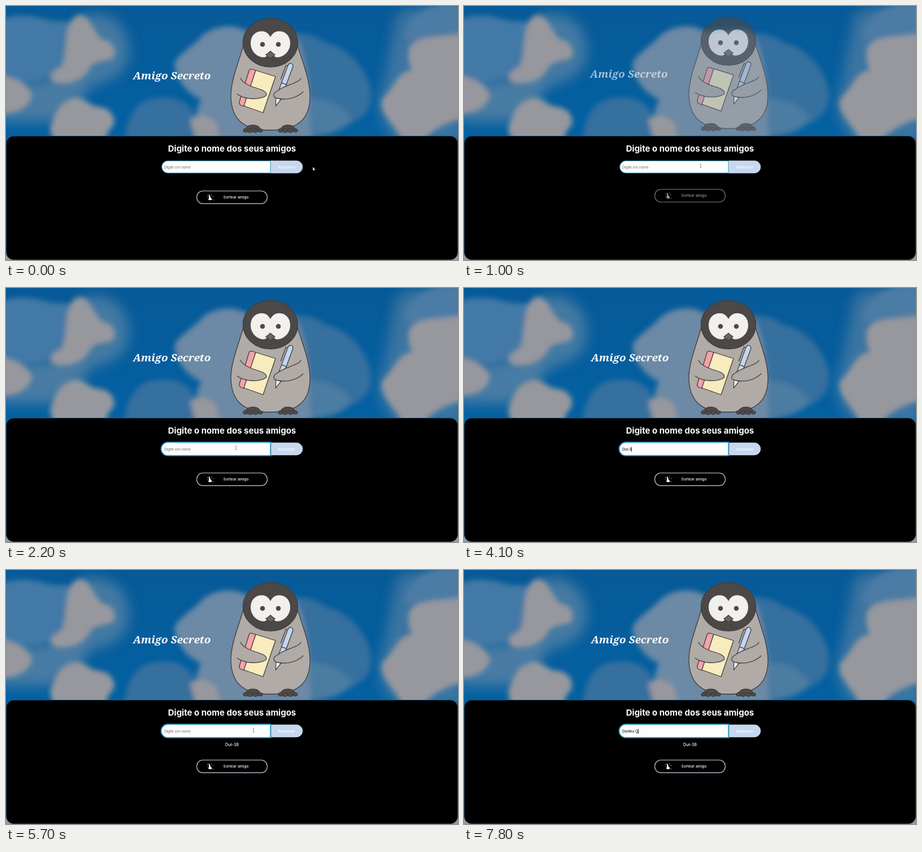
An HTML page for the animation above (8 s loop, 800 by 450 pixels).

```html
<!DOCTYPE html>
<html lang="pt">
<head>
<meta charset="utf-8">
<style>
  html, body { margin: 0; width: 100%; height: 100%; overflow: hidden; background: #000; }
  svg { display: block; width: 100%; height: 100%; }
  text { fill: #fff; white-space: pre; }
  .ui { font: 500 6.67px Inter, sans-serif; }
  .field { font: 6.67px "Liberation Sans", Arial, sans-serif; }
  .line { stroke: #403d3c; stroke-width: 1.3; stroke-linejoin: round; stroke-linecap: round; }
</style>
</head>
<body>
<svg viewBox="0 0 800 450">
  <defs>
    <filter id="soft" x="-10%" y="-10%" width="120%" height="120%"><feGaussianBlur stdDeviation="5"/></filter>
    <filter id="haze" x="-20%" y="-20%" width="140%" height="140%"><feGaussianBlur stdDeviation="11"/></filter>
    <linearGradient id="sky" x2="0" y2="1">
      <stop stop-color="#075a98"/><stop offset=".5" stop-color="#0461a2"/>
    </linearGradient>
    <g id="foot" class="line" fill="#504b49">
      <path d="M-13 5C-14-1-9-6 0-6S13-2 14 5Z"/>
      <path d="M-17 4C-17 0-10-2-9 4C-9 7-17 7-17 4M-9 4C-9-1-1-1-1 4C-1 8-9 8-9 4M0 4C0-1 8-1 8 4C8 8 0 8 0 4M9 4C9-1 17 0 17 4C17 7 9 7 9 4"/>
    </g>
  </defs>

  <rect width="800" height="450" fill="url(#sky)"/>
  <g filter="url(#haze)" fill="#5f86a6">
    <path d="M130 20C165 5 200 20 212 50C225 85 215 115 185 130L130 150Z" opacity=".7"/>
    <path d="M-10 140L60 130L140 115V165L85 205H-10Z" opacity=".75"/>
    <path d="M690 20C700 0 740 0 810 0V240H690C665 210 650 180 668 140Z" opacity=".6"/>
  </g>
  <g filter="url(#soft)">
    <path fill="#4279a6" d="M-10 25C20 12 50 18 75 25S130 15 128 60L110 105C80 130 60 140-10 135Z"/>
    <path fill="#34709f" d="M210 240C212 200 228 172 255 165C290 157 315 165 330 185L345 240Z"/>
    <path fill="#34709f" d="M505 50C530 45 555 55 565 65C595 70 622 95 634 118C648 142 650 165 640 185C620 212 585 220 550 215H505Z"/>
    <path fill="#4c7ba2" d="M530 165C560 160 600 175 612 200C600 222 570 228 530 235Z"/>
    <path fill="#6c89a5" d="M298 102C305 85 330 72 350 50C370 35 405 30 425 45L500 40C525 60 530 100 535 140L540 240H345C330 190 340 180 345 165C320 155 300 130 298 102Z"/>
    <path fill="#4c7ba5" d="M705 60C705 20 740 5 775-5H810V60Z"/>
    <g fill="#97989e">
      <path d="M114 30C122 12 140 12 150 30C158 45 165 55 172 60C185 60 198 75 190 92C175 100 160 95 150 108C142 125 125 138 95 138C72 135 75 118 98 108C108 95 104 50 114 30Z"/>
      <path d="M-10 122C20 128 42 142 46 158C42 180 20 190-10 192Z"/>
      <path d="M78 218C85 190 95 170 115 165C130 155 145 175 160 178C185 180 195 195 190 212C175 225 180 235 175 245H85Z"/>
      <path d="M326 202C338 190 355 192 372 207L380 245H338Z"/>
      <path d="M714 72C730 50 770 57 810 48V150H760C730 140 705 110 714 72Z"/>
      <path d="M666 165C690 140 690 125 710 115L810 110V200C780 205 750 220 735 245H704C692 212 658 190 666 165Z"/>
      <path d="M-10 430H810V460H-10Z"/>
    </g>
  </g>

  <rect x=".5" y="230.5" width="799" height="219" rx="13" stroke="#164a68"/>

  <text id="title" x="224.8" y="130" style="font:italic 700 18.9px 'Noto Serif',serif">Amigo Secreto</text>

  <g id="penguin">
    <path class="line" fill="#b1aba7" d="M420 70C412 100 398 130 398 160C399 198 417 220 468 220S538 198 538 160C538 130 525 100 516 70Z"/>
    <ellipse class="line" cx="468" cy="65" rx="48.5" ry="43" fill="#4b4847"/>
    <path fill="#f2f0ee" d="M468 55C463 45 455 44 449 45C438 47 433 56 433 66C433 80 444 91 457 91L468 86L479 91C492 91 503 80 503 66C503 56 498 47 487 45C481 44 473 45 468 55Z"/>
    <circle cx="454" cy="68" r="4.3" fill="#4b4847"/>
    <circle cx="482" cy="68" r="4.3" fill="#4b4847"/>
    <path class="line" fill="#6e6561" d="M468 80Q472 84 476 86Q473 90 468 93Q463 90 460 86Q464 84 468 80Z"/>
    <g class="line">
      <path fill="#f4a3a8" d="M442 114L435 112Q431 111 430 115L413 170Q412 174 416 176L422 178Z"/>
      <path fill="#f8ebbd" d="M442 114L477 125L455 189L421 177Z"/>
      <g transform="translate(505 102) rotate(20.2)" fill="#c3d6f1">
        <path d="M-4.5 66V5Q-4 0 0 0T4.5 5V66Z"/>
        <path d="M-4.5 38H4.5M-5 6H-8V32" fill="none"/>
        <path d="M-4.5 66H4.5L0 80Z" fill="#fff"/>
      </g>
      <path fill="#b1aba7" d="M415 128C420 138 435 143 448 147C458 150 463 155 460 159C450 166 425 167 409 156"/>
      <path fill="#b1aba7" d="M522 128C518 137 495 139 481 150C470 156 473 163 482 164C500 167 515 162 526 152"/>
    </g>
    <use href="#foot" x="437" y="217"/>
    <use href="#foot" x="499" y="217"/>
  </g>

  <text x="400" y="258" text-anchor="middle" style="font:700 15px Inter,sans-serif">Digite o nome dos seus amigos</text>

  <path d="M468 274.3H514A10.8 10.8 0 0 1 514 295.9H468Z" fill="#c5d8f0" stroke="#d3e1f4" stroke-width=".8"/>
  <text class="ui" x="496.8" y="287.6" text-anchor="middle">Adicionar</text>
  <path id="box" fill="#fdfdff" stroke="#2d93bd"/>
  <text id="value" class="field" x="280" y="287.7"></text>
  <path id="caret" d="M0 281.5V290" stroke="#000" stroke-width=".8"/>

  <text id="friend" x="400" y="311.7" text-anchor="middle" style="font:500 7.2px Inter,sans-serif"></text>

  <g id="draw">
    <rect x="337.7" y="327.7" width="124.6" height="22.4" rx="10.5" stroke="#c8d8ee" stroke-width="1.1"/>
    <path fill="#f4f1e4" d="M358.5 334.5Q360.5 333.5 361 336L362 339L365 342.5Q363 344.5 359.5 344L358 342.5Q360 340 358.5 334.5Z"/>
    <path fill="#f4f1e4" d="M356 335h1v1h-1zM363 334h1v1h-1zM366 337h1v1h-1zM356 339h.8v.8h-.8zM366 343h1v1h-1z"/>
    <text class="ui" x="407" y="341.3" text-anchor="middle">Sortear amigo</text>
  </g>

  <g id="cursor">
    <path id="arrow" fill="#fff" stroke="#222" stroke-width=".4" d="M0 0V6.6L1.5 5.3L2.5 7.5L3.5 7L2.5 5H4.5Z"/>
    <path id="hand" fill="#fff" stroke="#222" stroke-width=".7" d="M-1 4V-.5Q0-1.5 1-.5V2.5L4 3.3V7L3 9H-.5L-2.6 5.5Q-2 4-1 5Z"/>
    <path id="beam" fill="none" stroke="#444" stroke-width=".6" d="M-1.3-2.8H1.3M0-2.8V3.2M-1.3 3.2H1.3"/>
  </g>
</svg>
<script>
const $ = id => document.getElementById(id);
const LOOP = 8000, STEP = 100;
const entries = [
  { text: "Dut-38", keys: [3100, 3300, 3500, 3900, 4100, 4300], sent: 4900 },
  { text: "Dorileu Q", keys: [6000, 6200, 6400, 6600, 7000, 7200, 7300, 7500, 7800], sent: LOOP }
];
const reload = 650, focusAt = 1400, refocusAt = 5200;
const pointerPath = [[0, 543, 285], [300, 543, 285], [800, 482, 284], [1000, 419, 283], [1300, 407, 283],
  [4600, 407, 283], [4900, 490, 285], [5000, 490, 285], [5200, 445, 284], [5500, 438, 284], [LOOP, 438, 284]];

// CSS "ease" timing curve
function ease(x) {
  if (x <= 0 || x >= 1) return x <= 0 ? 0 : 1;
  const bez = (a, b, s) => 3 * a * s * (1 - s) ** 2 + 3 * b * s * s * (1 - s) + s ** 3;
  let lo = 0, hi = 1;
  for (let i = 0; i < 20; i++) {
    const mid = (lo + hi) / 2;
    bez(.25, .25, mid) < x ? lo = mid : hi = mid;
  }
  return bez(.1, 1, lo);
}

function pointerAt(t) {
  const i = pointerPath.findIndex(p => p[0] > t);
  const [t0, x0, y0] = pointerPath[i - 1], [t1, x1, y1] = pointerPath[i];
  const k = (t - t0) / (t1 - t0);
  return [x0 + (x1 - x0) * k, y0 + (y1 - y0) * k];
}

const show = (id, on) => $(id).setAttribute("visibility", on ? "inherit" : "hidden");

function fadeIn(id, p, dx, dy) {
  $(id).setAttribute("opacity", p);
  $(id).setAttribute("transform", `translate(${dx} ${dy})`);
}

function render(t) {
  const p = t < reload ? 1 : ease((t - reload) / 1000);
  const drop = -7.4 * (1 - p);
  const added = t >= entries[0].sent;
  fadeIn("title", p, -4.4 * (1 - p), drop);
  fadeIn("penguin", p, 0, drop);
  fadeIn("draw", p, 0, drop + (added ? 9 : 0));
  $("friend").textContent = added ? entries[0].text : "";

  const entry = entries[added ? 1 : 0];
  const typed = entry.text.slice(0, entry.keys.filter(k => k <= t).length);
  $("value").textContent = typed || "Digite um nome";
  $("value").style.fill = typed ? "#000" : "#757575";

  const focused = t >= focusAt && !(added && t < refocusAt);
  $("box").setAttribute("d", focused
    ? "M468.3 273.3H286.5A11.9 11.9 0 0 0 286.5 297.1H468.3Z"
    : "M468 274.3H286.5A10.8 10.8 0 0 0 286.5 295.9H468Z");
  $("box").setAttribute("stroke-width", focused ? 2 : 1);

  const lastInput = Math.max(...[focusAt, refocusAt, ...entries[0].keys, ...entries[1].keys].filter(k => k <= t));
  show("caret", focused && (t - lastInput) % 1000 < 500);
  const caretX = 280.3 + (typed ? $("value").getComputedTextLength() : 0);
  $("caret").setAttribute("transform", `translate(${caretX} 0)`);

  const [x, y] = pointerAt(t);
  $("cursor").setAttribute("transform", `translate(${x} ${y})`);
  show("cursor", t < 3100 || (t >= 4600 && t < 6000));
  show("arrow", x > 525);
  show("hand", x <= 525 && x > 468);
  show("beam", x <= 468);
}

function tick() {
  render(Math.floor(performance.now() % LOOP / STEP) * STEP);
  requestAnimationFrame(tick);
}
tick();
</script>
</body>
</html>
```
